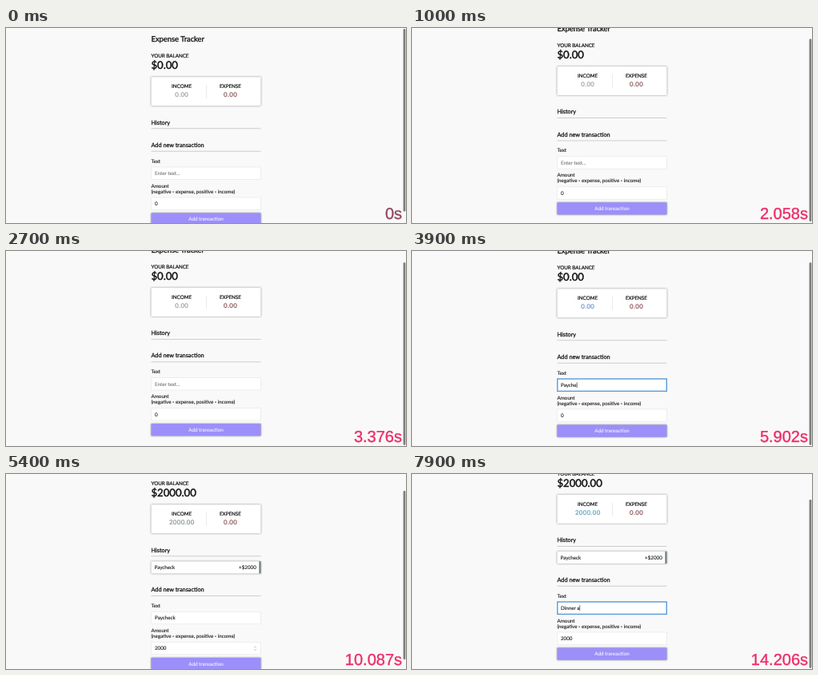
Recreate the animation shown at these times as an HTML page. Size 500x244 px, loop 8 s.

```html
<!DOCTYPE html>
<html lang="en">
<head>
<meta charset="utf-8">
<title>Expense Tracker</title>
<style>
  html, body { margin: 0; width: 100%; height: 100%; overflow: hidden; background: #f9f9f9; }
  svg { display: block; width: 500px; height: 244px; }
  text {
    font: 6.25px Lato, sans-serif; color: #111; fill: currentColor;
    stroke: currentColor; stroke-width: .015em;
    white-space: pre; text-rendering: geometricPrecision;
  }
  .bold { stroke-width: .035em; }
  .title { font-size: 9.4px; }
  .total { font-size: 13.1px; }
  .head { font-size: 7.3px; }
  .sum { font-size: 7.8px; letter-spacing: .39px; stroke-width: .03em; }
  .mid { text-anchor: middle; }
  .end { text-anchor: end; }
  .card { fill: #fff; filter: drop-shadow(0 .6px .8px #0007); }
  .field { fill: #fff; stroke: #e4e4e4; stroke-width: .6; }
  .field.focus { stroke: #5a9ad6; stroke-width: 1.4; }
  .rule { fill: #c4c4c4; }
  #timer { font: 20px "Liberation Sans", Arial, sans-serif; stroke-width: .4px; }
</style>
</head>
<body>
<svg viewBox="0 0 500 244">
  <g id="page">
    <text class="bold title" x="181.5" y="17.3">Expense Tracker</text>
    <text class="bold" x="181.5" y="37.2">YOUR BALANCE</text>
    <text class="bold total" id="balance" x="181.5" y="51.2"></text>
    <rect class="card" x="181.5" y="61.3" width="137" height="36"/>
    <rect x="250" y="71" width=".6" height="17" fill="#dedede"/>
    <text class="bold mid" x="219.6" y="75.4">INCOME</text>
    <text class="sum mid" id="income" x="219.8" y="86.4"></text>
    <text class="bold mid" x="280.4" y="75.4">EXPENSE</text>
    <text class="sum mid" x="280.6" y="86.4" style="color:#8c5557">0.00</text>
    <text class="bold head" x="181.5" y="120.5">History</text>
    <rect class="rule" x="181.5" y="125.4" width="137" height=".8"/>
    <g id="item">
      <rect class="card" x="181.5" y="132.3" width="137" height="15.2"/>
      <rect x="316.4" y="132.3" width="2.1" height="15.2" fill="#667a76"/>
      <text x="185.5" y="142.2">Paycheck</text>
      <text class="end" x="312.8" y="142.2">+$2000</text>
    </g>
    <g id="form">
      <text class="bold head" x="181.5" y="148.8">Add new transaction</text>
      <rect class="rule" x="181.5" y="153.8" width="137" height=".8"/>
      <text x="181.5" y="168.6">Text</text>
      <rect class="field" id="nameBox" x="181.8" y="174" width="136.5" height="15.4"/>
      <text id="name" x="186" y="184"></text>
      <text x="181.5" y="199.5">Amount</text>
      <text x="181.5" y="206.7">(negative - expense, positive - income)</text>
      <rect class="field" id="amountBox" x="181.8" y="212" width="136.5" height="15.4"/>
      <text id="amount" x="186" y="222"></text>
      <path id="spinner" d="M310.2 218.8l1.3-1.4 1.3 1.4M310.2 220.8l1.3 1.4 1.3-1.4" fill="none" stroke="#999" stroke-width=".6"/>
      <rect id="caret" width=".6" height="7" fill="#111"/>
      <rect class="card" x="181.5" y="231.5" width="137" height="15.2" style="fill:#9c8ffa"/>
      <text class="mid" x="250" y="241.4" style="color:#f6f4ff">Add transaction</text>
    </g>
  </g>
  <rect id="thumb" x="496.6" width="2.8" rx="1.4" fill="#7d7d7d"/>
  <text id="timer" class="end" x="495" y="239"></text>
</svg>
<script>
const $ = id => document.getElementById(id);
const LOOP = 8000, STEP = 100, VIEW = 244, ITEM_H = 21.4, MAX = 14;

const clock = [[0, 0], [100, 1.36], [1000, 2.058], [2700, 3.376], [3900, 5.902],
  [5100, 9.88], [5400, 10.087], [6200, 10.638], [7900, 14.206]];
const scroll = [[0, 0], [100, .5], [500, 6], [1000, 13.2], [1400, 14.5], [2700, 15.4],
  [3000, MAX], [5100, MAX], [5400, 23], [5900, 34.8], [6200, MAX + ITEM_H]];

function at(keys, t) {
  const i = keys.findIndex(k => k[0] > t);
  if (i < 0) return keys[keys.length - 1][1];
  const [t0, a] = keys[i - 1], [t1, b] = keys[i];
  return a + (b - a) * (t - t0) / (t1 - t0);
}

// One character per step, the first one at the start time.
const typed = (word, start, t) => word.slice(0, Math.max(0, (t - start) / STEP + 1));
const show = (id, on) => $(id).style.display = on ? '' : 'none';
const move = (id, y) => $(id).setAttribute('transform', `translate(0 ${y})`);

function draw(t) {
  const added = t >= 5000;
  const onName = t >= 3100 && t < 4200 || t >= 6700;
  const onAmount = t >= 4200 && t < 4900;
  const y = at(scroll, t), max = MAX + (added ? ITEM_H : 0);

  move('page', -y);
  move('form', added ? ITEM_H : 0);
  show('item', added);
  $('balance').textContent = added ? '$2000.00' : '$0.00';
  $('income').textContent = added ? '2000.00' : '0.00';
  $('income').style.color = onName ? (added ? '#64a0b8' : '#6f94c8') : added ? '#879294' : '#a0a0a0';

  const name = t < 7200 ? typed('Paycheck', 3400, t) : typed('Dinner a', 7200, t);
  $('name').textContent = name || (onName ? '' : 'Enter text...');
  $('name').style.color = name ? '#111' : '#757575';
  $('amount').textContent = typed('2000', 4400, t) || '0';
  $('nameBox').classList.toggle('focus', onName);
  $('amountBox').classList.toggle('focus', onAmount);
  show('spinner', t >= 4200 && t < 5500);

  show('caret', onName || onAmount);
  const field = $(onAmount ? 'amount' : 'name');
  const width = field.textContent ? field.getComputedTextLength() : 0;
  $('caret').setAttribute('x', 186.2 + width);
  $('caret').setAttribute('y', onAmount ? 216.2 : 178.2);

  const size = VIEW * VIEW / (VIEW + max);
  $('thumb').setAttribute('height', size - 2);
  $('thumb').setAttribute('y', 1 + Math.min(1, y / max) * (VIEW - size));

  $('timer').textContent = (t ? at(clock, t).toFixed(3) : '0') + 's';
  $('timer').style.color = t ? '#ee2e69' : '#8f4a60';
}

function tick() {
  draw(Math.floor(performance.now() % LOOP / STEP) * STEP);
  requestAnimationFrame(tick);
}
tick();
</script>
</body>
</html>
```
